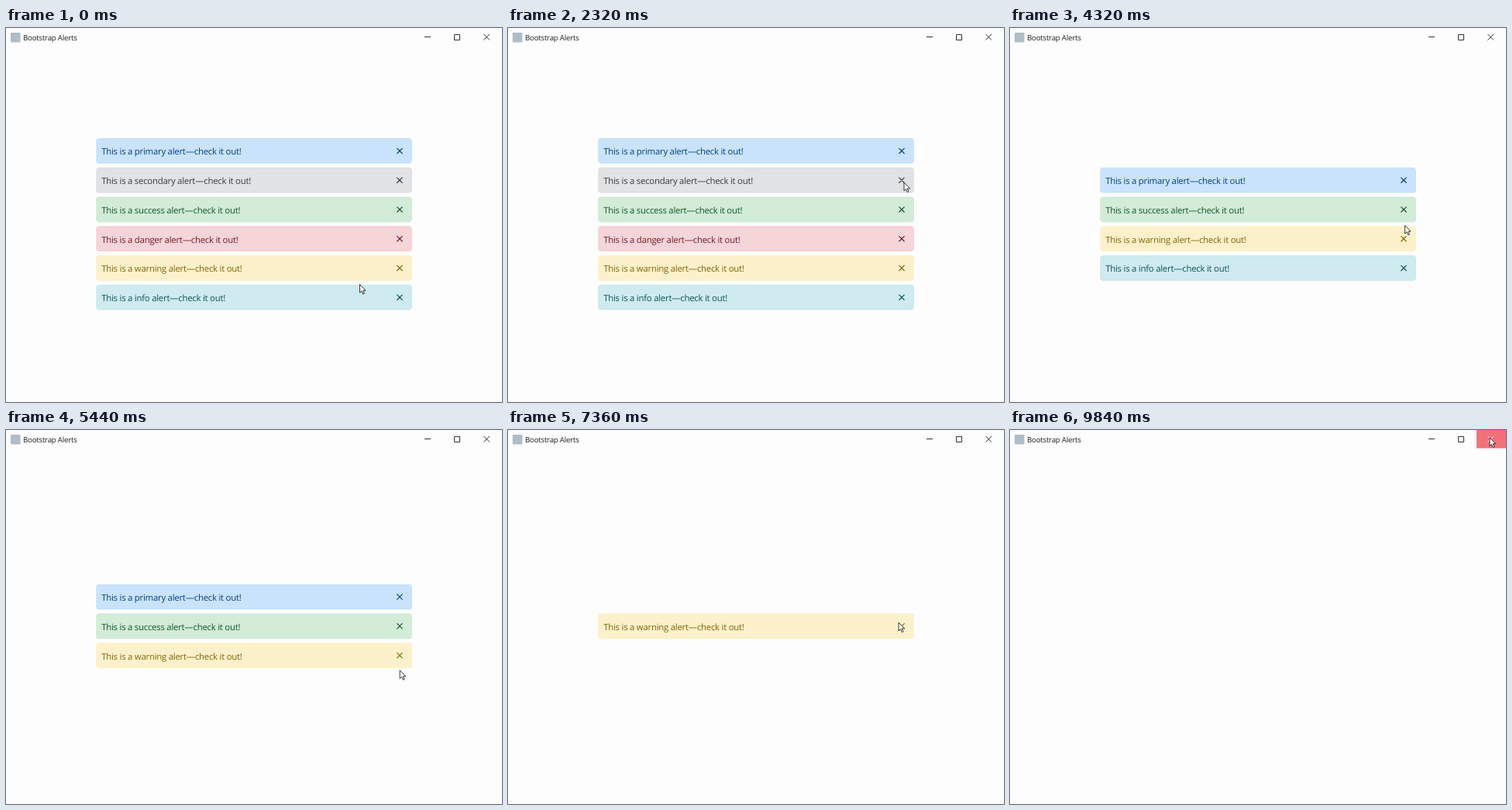
Recreate the animation shown at these times as an HTML page. Size 640x482 px, loop 9.92 s.

```html
<!DOCTYPE html>
<html lang="en">
<head>
<meta charset="utf-8">
<title>Bootstrap Alerts</title>
<style>
  html, body { margin: 0; width: 100%; height: 100%; overflow: hidden; background: #fdfdfd; }
  svg { display: block; width: 640px; height: 482px; font-family: "Open Sans", "Noto Sans", sans-serif; }
  text { text-rendering: geometricPrecision; }
  .title { font-size: 9.7px; letter-spacing: -.22px; fill: #222; }
  .alert text { font-size: 11.4px; letter-spacing: -.25px; }
  .control { fill: none; stroke: #333; }
</style>
</head>
<body>
<svg viewBox="0 0 640 482">
  <rect width="640" height="482" fill="#fdfdfd"/>
  <rect x="6" y="6" width="12.5" height="12.5" rx="1" fill="#b0bcc6"/>
  <text class="title" x="22" y="15.6">Bootstrap Alerts</text>
  <path class="control" d="M540 11.5H548M578.5 8.5H585.5V15.5H578.5Z"/>
  <rect id="closeBack" x="602" width="38" height="23.5"/>
  <path id="closeMark" class="control" d="M616.5 8L624 15.5M624 8L616.5 15.5"/>
  <g id="alerts"></g>
  <path id="cursor" d="M0 0V10.7L2.5 8.4L4.3 12.5L6 11.7L4.2 7.7H7.6Z" fill="#fff" stroke="#222" stroke-width=".9"/>
</svg>
<script>
const LOOP = 9920, STEP = 80;
const LEFT = 116.3, WIDTH = 407.5, HEIGHT = 32.8, PITCH = 37.75, CENTER = 252.8;
const MIDDLE = HEIGHT / 2, CLOSE_X = 508;
const EXIT_PRESS = 9760;

const alerts = [
  { name: "primary", theme: "#007bff", removedAt: 6880 },
  { name: "secondary", theme: "#6c757d", removedAt: 2800 },
  { name: "success", theme: "#28a745", removedAt: 6240 },
  { name: "danger", theme: "#dc3545", removedAt: 4240 },
  { name: "warning", theme: "#ffc107", removedAt: 7760 },
  { name: "info", theme: "#17a2b8", removedAt: 5360 }
];

const byId = id => document.getElementById(id);
const clamp = value => Math.max(0, Math.min(1, value));
const smooth = p => p * p * (3 - 2 * p);
const mix = (color, share, base) => `color-mix(in srgb, ${color} ${share}%, ${base})`;

function add(parent, tag, attributes, style = {}) {
  const node = document.createElementNS("http://www.w3.org/2000/svg", tag);
  for (const key in attributes) node.setAttribute(key, attributes[key]);
  Object.assign(node.style, style);
  return parent.appendChild(node);
}

function build(alert) {
  const ink = mix(alert.theme, 52, "black");
  const group = alert.group = add(byId("alerts"), "g", { class: "alert" });
  add(group, "rect",
    { x: LEFT + .5, y: .5, width: WIDTH - 1, height: HEIGHT - 1, rx: 3, "stroke-width": .7 },
    { fill: mix(alert.theme, 20, "#fdfdfd"), stroke: mix(alert.theme, 28, "#fdfdfd") });
  add(group, "text", { x: 123.2, y: 21.4 }, { fill: ink })
    .textContent = `This is a ${alert.name} alert—check it out!`;
  alert.ripple = add(group, "circle", { cx: CLOSE_X, cy: MIDDLE, fill: "#555", opacity: .25 });
  add(group, "path",
    { d: `M${CLOSE_X - 3.6} ${MIDDLE - 3.6}l7.2 7.2m0 -7.2l-7.2 7.2`, fill: "none", "stroke-width": 1.15 },
    { stroke: ink });
}

// The remaining alerts form a vertically centred stack.
function stackAt(time) {
  const shown = alerts.filter(alert => time < alert.removedAt);
  const top = CENTER - MIDDLE - (shown.length - 1) * PITCH / 2;
  return { shown, rowTop: row => top + row * PITCH };
}

// The pointer visits each close button in order of removal, drifting up and left.
function planRoute() {
  let previous = 0;
  const order = [...alerts].sort((a, b) => a.removedAt - b.removedAt);
  const stops = order.map((alert, i) => {
    const { shown, rowTop } = stackAt(alert.removedAt - 1);
    const drift = 3 - 1.4 * i;
    const leave = previous + 2 * STEP;
    previous = alert.removedAt;
    return {
      x: CLOSE_X + drift, y: rowTop(shown.indexOf(alert)) + MIDDLE + drift,
      leave, arrive: (leave + alert.removedAt) / 2
    };
  });
  return [...stops, { x: 619, y: 10, leave: 8560, arrive: 9600 }];
}

function pointerAt(time) {
  let x = 456.5, y = 330.5;
  for (const stop of route) {
    const p = smooth(clamp((time - stop.leave) / (stop.arrive - stop.leave)));
    x += (stop.x - x) * p;
    y += (stop.y - y) * p;
  }
  return [x, y];
}

function drawAlerts(time) {
  const { shown, rowTop } = stackAt(time);
  for (const alert of alerts) {
    const row = shown.indexOf(alert);
    alert.group.setAttribute("visibility", row < 0 ? "hidden" : "visible");
    alert.group.setAttribute("transform", `translate(0 ${rowTop(row)})`);
    const pressedFor = time - alert.removedAt + 3 * STEP;
    alert.ripple.setAttribute("r", 16 * clamp(pressedFor / (2 * STEP)));
  }
}

function draw(time) {
  drawAlerts(time);
  const [x, y] = pointerAt(time);
  byId("cursor").setAttribute("transform", `translate(${x} ${y})`);
  const hover = x >= 602 && y < 23.5;
  const red = time >= EXIT_PRESS ? "#f1707a" : "#e81123";
  byId("closeBack").setAttribute("fill", hover ? red : "none");
  byId("closeMark").style.stroke = hover ? "#fff" : "";
}

alerts.forEach(build);
const route = planRoute();
const start = performance.now();

function tick() {
  const time = (performance.now() - start) % LOOP;
  draw(Math.floor(time / STEP) * STEP);
  requestAnimationFrame(tick);
}
tick();
</script>
</body>
</html>
```
